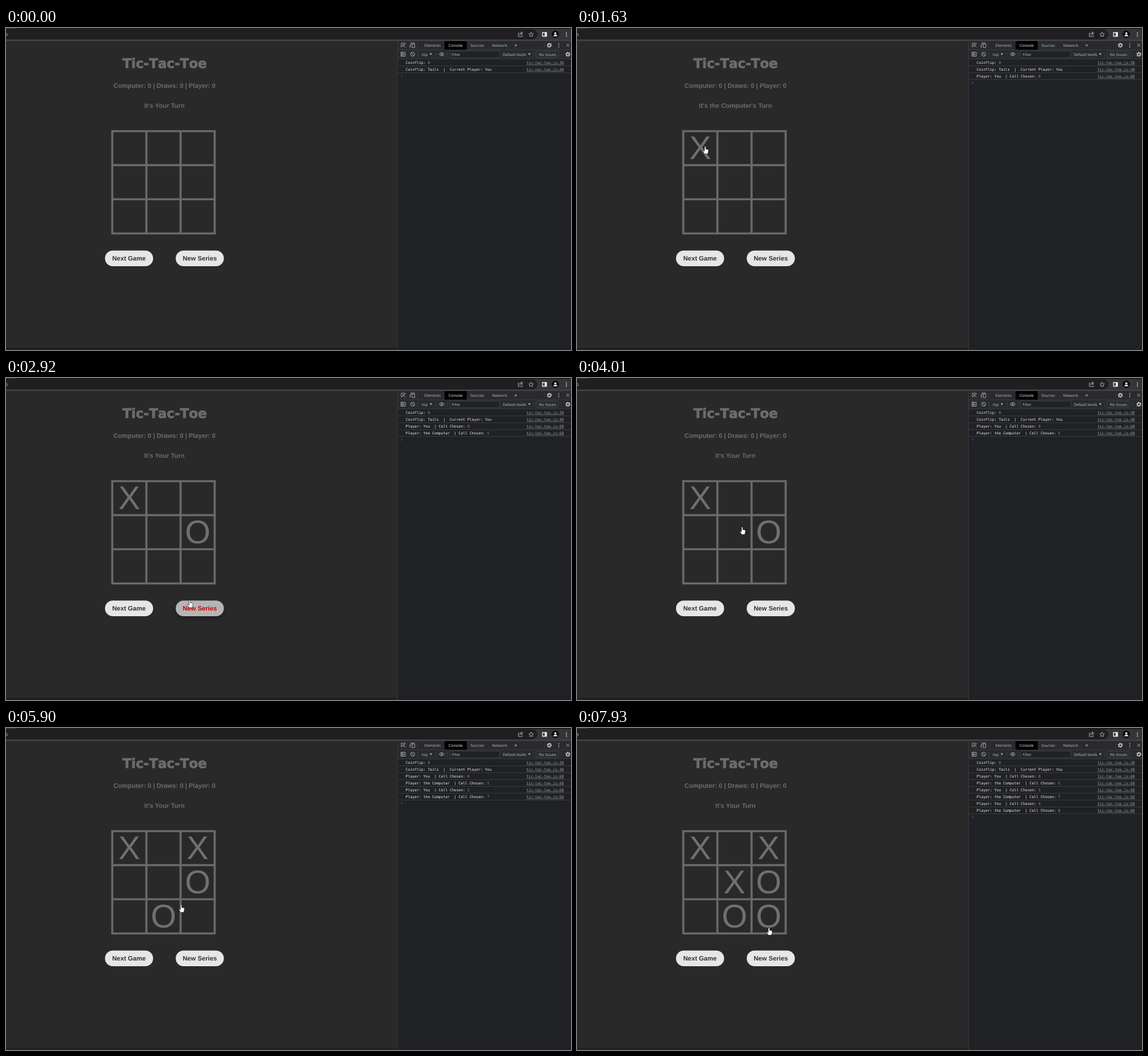
Write an HTML page that moves like this. It is 992x565 px and loops after 8 s.

```html
<!DOCTYPE html>
<html lang="en">
<head>
<meta charset="utf-8">
<title>Tic-Tac-Toe</title>
<style>
html, body { margin: 0; width: 100%; height: 100%; overflow: hidden; background: #292929; }
svg { display: block; width: 992px; height: 565px; }
text { text-rendering: geometricPrecision; white-space: pre; }

.page { font: bold 11.25px "Liberation Sans", Arial, sans-serif; fill: #6c6c6c; text-anchor: middle; }
.title { font: bold 23px "DejaVu Sans", sans-serif; font-kerning: none; stroke: #6c6c6c; stroke-width: .8; }
.marks { font-size: 57.5px; font-weight: normal; fill: #707070; }
.grid { fill: none; stroke: #6a6a6a; stroke-width: 3.7; }
.pill { fill: #e6e6e6; }
.pill + text { fill: #333; }
.ui { font: 6.6px "Open Sans", "Noto Sans", sans-serif; fill: #bdc1c6; }
.log { font: 6.43px "DejaVu Sans Mono", monospace; fill: #f0f0f0; }
.log .num { fill: #9980ff; }
.log .link { fill: #9a9da1; text-anchor: end; text-decoration: underline; }
.icon { fill: none; stroke: #b4b7bb; stroke-width: .9; }
.rule { stroke: #414246; stroke-width: .8; }

/* percentages are ms / 80 */
.m1, .m2, .m3, .m4, .m5, .m6, .you, .cpu, .prompt, .cursor, .arrow, .hand, .hot, .glow, .label {
  animation: 8s step-end infinite;
}
.m1 { animation-name: m1; }
.m2 { animation-name: m2; }
.m3 { animation-name: m3; }
.m4 { animation-name: m4; }
.m5 { animation-name: m5; }
.m6 { animation-name: m6; }
@keyframes m1 { 0% { visibility: hidden } 19.5%, 100% { visibility: visible } }
@keyframes m2 { 0% { visibility: hidden } 32%, 100% { visibility: visible } }
@keyframes m3 { 0% { visibility: hidden } 54.375%, 100% { visibility: visible } }
@keyframes m4 { 0% { visibility: hidden } 67%, 100% { visibility: visible } }
@keyframes m5 { 0% { visibility: hidden } 79.625%, 100% { visibility: visible } }
@keyframes m6 { 0% { visibility: hidden } 92.125%, 100% { visibility: visible } }

.you { animation-name: you; }
.cpu { animation-name: cpu; }
@keyframes you {
  0%, 32%, 67%, 92.125%, 100% { visibility: visible }
  19.5%, 54.375%, 79.625% { visibility: hidden }
}
@keyframes cpu {
  0%, 32%, 67%, 92.125%, 100% { visibility: hidden }
  19.5%, 54.375%, 79.625% { visibility: visible }
}
.prompt { animation-name: prompt; }
@keyframes prompt {
  0% { translate: 0 0 }
  19.5% { translate: 0 12px }
  32% { translate: 0 24px }
  54.375% { translate: 0 36px }
  67% { translate: 0 48px }
  79.625% { translate: 0 60px }
  92.125%, 100% { translate: 0 72px }
}

.hot { animation-name: hot; }
.glow { animation-name: glow; }
.label { animation-name: label; }
@keyframes hot {
  0%, 7.5%, 37.375%, 100% { fill: #e6e6e6 }
  5%, 33.15% { fill: #b5b5b5 }
}
@keyframes glow {
  0%, 7.5%, 37.375%, 100% { visibility: hidden }
  5%, 33.15% { visibility: visible }
}
@keyframes label {
  0%, 7.5%, 37.375%, 100% { fill: #333 }
  5%, 33.15% { fill: #cc0000 }
}

.cursor { animation-name: travel; }
@keyframes travel {
  0% { translate: 446px 518px }
  4.125% { translate: 385px 440px }
  5% { translate: 345px 404px }
  7.5% { translate: 345px 404px; animation-timing-function: steps(3, start) }
  10.125% { translate: 260.5px 308px; animation-timing-function: steps(3, start) }
  12.75% { translate: 232px 226px; animation-timing-function: steps(4, start) }
  16.25% { translate: 225px 207.5px }
  24.5% { translate: 225px 207.5px; animation-timing-function: steps(6, start) }
  29.75% { translate: 290px 310px; animation-timing-function: steps(5, start) }
  34% { translate: 322px 400px }
  34.75% { translate: 322px 400px; animation-timing-function: steps(3, start) }
  37.375% { translate: 322.5px 389.5px; animation-timing-function: steps(4, start) }
  41% { translate: 277px 273.5px }
  42.625% { translate: 278px 273.5px }
  50.125% { translate: 278px 273.5px; animation-timing-function: steps(5, start) }
  54.375% { translate: 338px 212px; animation-timing-function: steps(5, start) }
  58.75% { translate: 322px 375.5px }
  70.25% { translate: 322px 375.5px; animation-timing-function: steps(2, start) }
  72% { translate: 327px 356px; animation-timing-function: steps(3, start) }
  74.625% { translate: 307.5px 310px; animation-timing-function: steps(3, start) }
  77.25% { translate: 283.5px 289px }
  86.25% { translate: 283.5px 289px; animation-timing-function: steps(10, start) }
  95% { translate: 337px 349px }
  99.125%, 100% { translate: 337px 350px }
}
.arrow { animation-name: arrow; }
.hand { animation-name: hand; }
@keyframes arrow {
  0%, 5%, 8.375%, 33.15%, 71.125%, 100% { visibility: hidden }
  3.25%, 7.5%, 31.45%, 57.875% { visibility: visible }
}
@keyframes hand {
  0%, 7.5%, 31.45%, 57.875% { visibility: hidden }
  5%, 8.375%, 33.15%, 71.125%, 100% { visibility: visible }
}
</style>
</head>
<body>
<svg viewBox="0 0 992 565">
  <defs>
    <filter id="blur" x="-20%" y="-50%" width="140%" height="220%"><feGaussianBlur stdDeviation="4"/></filter>
    <g id="gear">
      <circle r="2.5" fill="none" stroke="#b4b7bb" stroke-width="1.9"/>
      <circle r="3.8" fill="none" stroke="#b4b7bb" stroke-width="1.2" stroke-dasharray="1.8 2.18"/>
    </g>
    <g id="dots"><circle cy="-3" r=".9"/><circle r=".9"/><circle cy="3" r=".9"/></g>
    <path id="caret" d="M-2 -1.6h4l-2 3.4z"/>
  </defs>

  <!-- browser bar -->
  <rect width="992" height="23" fill="#353436"/>
  <rect width="992" height="1.4" fill="#131112"/>
  <rect width="18" height="1.4" fill="#353436"/>
  <rect x="-20" y="2" width="953" height="18" rx="9" fill="#201e20"/>
  <rect y="20.6" width="992" height="1.8" fill="#474648"/>
  <text class="ui" x="-.5" y="13.6">0</text>
  <g class="icon">
    <path d="M901.5 9h-2v6h7v-2.5M901.5 12.5q.5-3.5 4-3.5M904.5 6.8l3.2 2.4-3.2 2.4z"/>
    <path d="M922 7.2l1.2 2.7 3 .3-2.3 2 .7 2.9-2.6-1.5-2.6 1.5.7-2.9-2.3-2 3-.3z"/>
  </g>
  <path d="M942 8h7v6.5h-7z" fill="none" stroke="#f1f1f1" stroke-width="1.3"/>
  <path d="M945.8 8h3.4v6.5h-3.4z" fill="#f1f1f1"/>
  <circle cx="964.5" cy="11" r="6.5" fill="#0d0d0e"/>
  <path d="M961 14.4q0-2.6 3.5-2.6t3.5 2.6z" fill="#f1f1f1"/>
  <circle cx="964.5" cy="9.4" r="1.9" fill="#f1f1f1"/>
  <use href="#dots" x="984" y="11.5" fill="#d5d5d5"/>

  <!-- game -->
  <rect y="561" width="688" height="4" fill="#231f21"/>
  <g class="page">
    <text class="title" x="278.5" y="70.4">Tic-Tac-Toe</text>
    <text x="278.3" y="104.5">Computer: 0 | Draws: 0 | Player: 0</text>
    <text class="you" x="278.2" y="140.3">It's Your Turn</text>
    <text class="cpu" x="278.2" y="140.3">It's the Computer's Turn</text>
    <path class="grid" d="M186.6 181h179.8v179.5H186.6zM246.5 181v179.5M306.5 181v179.5M186.6 240.6h179.8M186.6 300.5h179.8"/>
    <g class="marks">
      <text class="m1" x="216.5" y="230.4">X</text>
      <text class="m2" x="336.5" y="290.2">O</text>
      <text class="m3" x="336.5" y="230.4">X</text>
      <text class="m4" x="276.5" y="350">O</text>
      <text class="m5" x="276.5" y="290.2">X</text>
      <text class="m6" x="336.5" y="350">O</text>
    </g>
    <rect class="pill" x="173.8" y="390.5" width="84.5" height="27.5" rx="13.75"/>
    <text x="215.9" y="408.3">Next Game</text>
    <rect class="glow" x="298" y="395" width="84.5" height="27.5" rx="13.75" fill="#000" fill-opacity=".25" filter="url(#blur)"/>
    <rect class="pill hot" x="298" y="390.5" width="84.5" height="27.5" rx="13.75"/>
    <text class="label" x="340.2" y="408.3">New Series</text>
  </g>

  <!-- developer tools -->
  <rect x="687" y="23" width="305" height="542" fill="#202124"/>
  <rect x="688" y="23" width="304" height="31" fill="#292a2d"/>
  <path class="rule" d="M687.5 23v542M688 38.2h304M688 54.2h304M723 26v9M946 26v9M723 42v9M755 42v9M775 42v9M926 42v9M975 42v9"/>
  <rect x="770" y="23" width="39" height="15" fill="#000"/>
  <g class="ui">
    <text x="734.8" y="32.7">Elements</text>
    <text x="777" y="32.7" fill="#fff">Console</text>
    <text x="815.2" y="32.7">Sources</text>
    <text x="853.6" y="32.7">Network</text>
    <text x="892.5" y="33" font-size="10">»</text>
    <text x="730" y="48.5">top</text>
    <rect x="779.5" y="40.6" width="87.5" height="11.4" fill="#202124" stroke="#46474a" stroke-width=".8"/>
    <text x="782.6" y="48.8">Filter</text>
    <text x="872.2" y="48.5">Default levels</text>
    <rect x="930.5" y="40.6" width="39.5" height="11.2" rx="1.5" fill="none" stroke="#4b4c50" stroke-width=".8"/>
    <text x="935.4" y="48.6" font-size="6.8">No Issues</text>
    <use href="#caret" x="746" y="46"/>
    <use href="#caret" x="918.8" y="46"/>
    <use href="#dots" x="970.5" y="30.3"/>
    <use href="#gear" x="954" y="30.3"/>
    <use href="#gear" x="986.5" y="46.2"/>
  </g>
  <g class="icon">
    <path d="M696 33h-2v-6.2h7v2M697 29.5l4.5 4.5M697 32.5v-3h3"/>
    <path d="M711 33.8h-1.7v-4h2M711 29.5v-3.2h6.5M713.2 28h4.5v6.3h-4.5z"/>
    <path d="M693.5 42.5h7.5v7h-7.5zM695.5 42.5v7M697.2 44.4l2 1.6-2 1.6z"/>
    <circle cx="714" cy="46" r="3.5"/><path d="M711.6 43.6l4.8 4.8"/>
    <path d="M760.5 46q4.5-5.6 9 0-4.5 5.6-9 0z"/><circle cx="765" cy="46" r="1.2"/>
    <path d="M983.8 27.6l5.2 5.2M989 27.6l-5.2 5.2"/>
  </g>
  <g class="log" id="log"></g>
  <path class="prompt" d="M693.8 82.1l2 2-2 2" fill="none" stroke="#3f6fc4" stroke-width=".9"/>

  <g class="cursor">
    <path class="arrow" d="M0 0V10L2.3 8 3.8 11.2 5.2 10.6 3.8 7.4H6.8Z" fill="#fff" stroke="#111" stroke-width=".6"/>
    <path class="hand" d="M-1.2 .8Q0-.6 1.2 .8V4.8L4.6 5.5Q6 5.9 5.9 7.5L5.3 10.8 4.4 13.6H-1L-3.4 9.3Q-4 7.7-2.8 7.5L-1.2 8.8Z" fill="#fff" stroke="#111" stroke-width=".7"/>
  </g>
</svg>
<script>
const move = (who, cell) => [`Player: ${who}  | Cell Chosen: `, cell, 68];
const you = cell => move("You", cell);
const computer = cell => move("the Computer", cell);

const rows = [
  ["Coinflip: ", 0, 38],
  ["Coinflip: Tails  |  Current Player: You", "", 40],
  you(0), computer(5), you(2), computer(7), you(4), computer(8)
];

document.getElementById("log").innerHTML = rows.map(([text, num, line], i) => {
  const y = 62.8 + 12 * i;
  const cls = i > 1 ? `m${i - 1}` : "";
  return `<g class="${cls}">
    <text x="701.8" y="${y}">${text}<tspan class="num">${num}</tspan></text>
    <text class="link" x="979.4" y="${y}">tic-tac-toe.js:${line}</text>
    <path class="rule" d="M688 ${y + 3.7}h304"/>
  </g>`;
}).join("");
</script>
</body>
</html>
```
